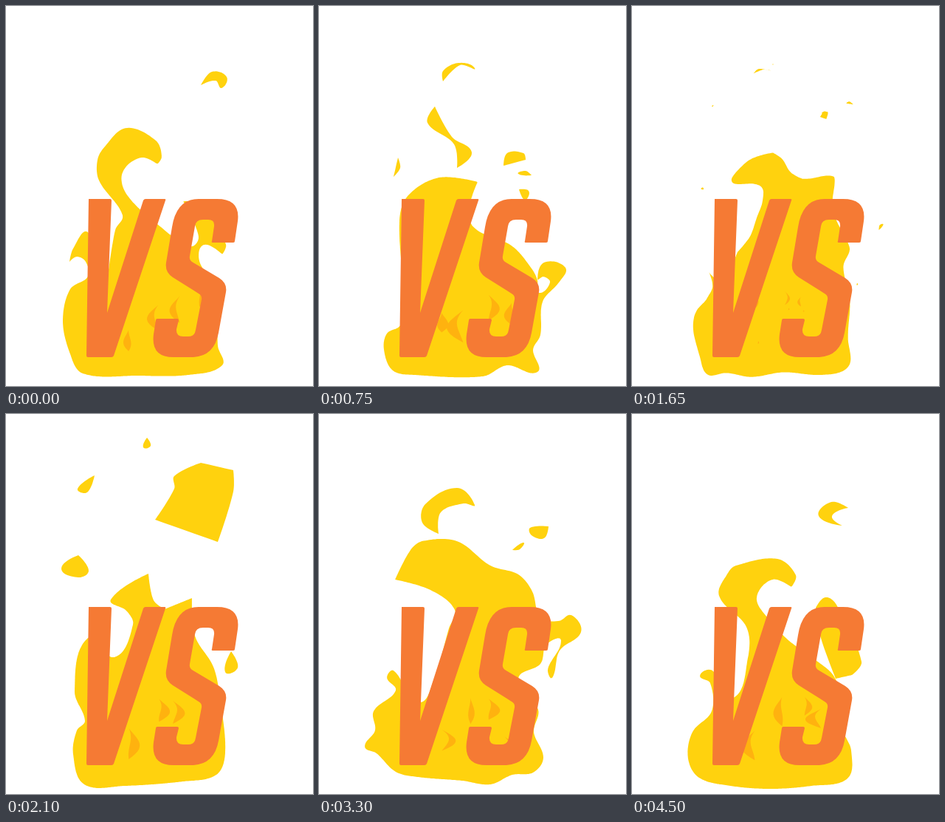
An HTML page that plays this animation: 416x514 px, repeating every 4650 ms.

```html
<!DOCTYPE html>
<html lang="en">
<head>
<meta charset="utf-8">
<title>VS</title>
<style>
html, body { margin: 0; width: 100%; height: 100%; overflow: hidden; background: #fff; }
svg { display: block; width: 100%; height: 100%; }
#body, #sparks { fill: #ffd20e; }
#licks { fill: #ffb20f; }
#letters { fill: #f57a34; }
</style>
</head>
<body>
<svg viewBox="0 0 416 514" role="img" aria-label="VS">
  <path id="body"/>
  <path id="licks"/>
  <path id="sparks"/>
  <g id="letters">
    <path d="M112 261H141Q143 261 143 263L137 415L186 263Q187 261 189 261H215Q217 261 216 263L146 473Q145 475 143 475H111Q109 475 109 473Z"/>
    <path d="M261 261H286Q318 261 314 291L310 318Q310 320 308 320H280Q278 320 279 318L282 298Q283 289 274 289H267Q257 289 256 298L249 338Q248 343 252 346L289 368Q300 375 298 387L288 442Q282 475 251 475H227Q196 475 200 444L203 425Q203 423 205 423H232Q234 423 234 425L231 437Q230 447 240 447H247Q256 447 257 438L265 397Q266 392 261 389L226 367Q215 360 217 347L225 299Q231 261 261 261Z"/>
  </g>
</svg>
<script>
const STEP = 150, STEPS = 31, RISE = 13;

// Key points joined by smooth curves; "!" marks a sharp corner.
// Each body starts at the lower left and runs clockwise.
const poses = [
  {
    at: 0,
    body: "104,497 86,468 77,425 87,383 111,366 108,346 96,339 86,346! 91,328 111,306 137,372! 148,303 158,283 126,236 124,208 134,190 163,165 203,182 211,204 205,214! 183,205 158,225 163,254 205,295 250,325 261,312 240,264! 262,268 298,322 293,336! 268,323 262,345 285,385 287,460 293,486 247,499 180,500",
    sparks: ["264,107! 279,89 299,96 292,111 284,101"]
  },
  {
    at: 5,
    body: "100,493 88,465 92,443 110,432 115,400 109,290 121,256 163,232 215,238! 205,293 262,325 288,355 296,371 298,388 313,374 304,366 296,370 305,347 334,354 325,374 303,400 300,445 290,465 296,495 255,486 222,501 130,499",
    sparks: [
      "168,102! 168,88 189,77 211,84 191,80",
      "157,136! 147,158 183,187 187,219! 207,198 180,177",
      "107,205! 101,231! 110,219",
      "250,216! 255,199 277,199 280,208!",
      "270,227 280,223 288,229!",
      "271,248! 284,250 281,262 276,260"
    ]
  },
  {
    at: 9,
    body: "100,497 91,470 79,412 95,382 108,366 104,343! 135,395 157,366 184,270 189,245 174,223 123,228 131,200 152,189 190,189 210,205 240,215 277,217 292,256 309,320 280,347 295,400 292,450 296,490 255,501 205,492 160,501 125,490",
    sparks: [
      "149,123! 165,108 206,113 182,110",
      "283,158! 294,152 307,162!",
      "331,336! 334,319 346,317"
    ]
  },
  {
    at: 14,
    body: "106,501 91,460 96,428 107,415 93,375 111,303 147,329 172,285 163,266 142,251 193,216! 200,252 215,264! 252,249! 256,300 281,342 290,385 297,458 285,488 240,497 160,503",
    sparks: [
      "191,32! 186,45 196,43",
      "120,83! 97,101 110,106",
      "264,66! 228,84 228,101 202,143! 287,173! 308,105 308,76!",
      "98,191! 75,209 98,221 112,212",
      "305,321! 297,349 314,343"
    ]
  },
  {
    at: 22,
    body: "104,484 78,459 62,450 76,428 74,402 104,374 92,357 101,347 135,390 156,358 176,290 184,265 151,238 103,224! 124,184 140,172 187,172 232,205 270,217 289,240 300,275 325,280 342,272 355,295 326,320 316,357 310,345 328,306 308,312 300,338 270,358 297,400 291,430 304,465 290,485 262,488 232,501 194,496 134,491",
    sparks: [
      "162,162! 140,147 144,122 187,100 211,123 196,121 165,133",
      "286,154 311,152! 305,168 288,164",
      "262,184! 277,174 272,183"
    ]
  },
  {
    at: 26,
    body: "100,493 89,465 108,425 95,345 111,307 143,275 144,200 185,159 228,187 272,181! 268,215 249,246 250,336 284,358 298,400 312,399! 302,425 299,475 272,488 268,502 230,506 185,492 140,499",
    sparks: [
      "177,15! 172,29 181,24",
      "109,85! 98,101 128,119! 138,102!",
      "205,136 225,127 284,149 263,181! 241,147 215,148",
      "19,236 64,206 107,220 117,254! 80,229 58,238"
    ]
  },
  {
    at: 30,
    body: "91,492 76,466 82,430 108,402 106,364 92,354 109,347 135,385 157,330 155,288 118,246 130,215 141,205 197,196 222,218 216,234! 190,224 169,248 183,275 212,306 245,330 275,357 288,410 287,430 297,455 292,493 243,503 188,507 134,503",
    sparks: [
      "253,138 270,119 293,127! 271,138 285,151!",
      "249,262! 262,248 277,258 311,335 298,353! 276,358! 255,300"
    ]
  }
];

const dist = (a, b) => Math.hypot(b[0] - a[0], b[1] - a[1]);
const mix = (a, b, u) => a + (b - a) * u;

// Turns key points into a dense closed polyline.
function trace(text) {
  const knots = text.split(" ").map(s => ({ p: s.replace("!", "").split(",").map(Number), sharp: s.endsWith("!") }));
  const n = knots.length;
  const dirs = knots.map((k, i) => {
    if (k.sharp) return [0, 0];
    const a = knots[(i + n - 1) % n].p, b = knots[(i + 1) % n].p, len = dist(a, b) || 1;
    return [(b[0] - a[0]) / len, (b[1] - a[1]) / len];
  });
  const out = [];
  knots.forEach(({ p }, i) => {
    const j = (i + 1) % n, q = knots[j].p, reach = dist(p, q) / 3;
    for (let s = 0; s < 12; s++) {
      const t = s / 12, r = 1 - t;
      out.push([0, 1].map(k =>
        r * r * r * p[k] + 3 * r * r * t * (p[k] + dirs[i][k] * reach) +
        3 * r * t * t * (q[k] - dirs[j][k] * reach) + t * t * t * q[k]));
    }
  });
  return out;
}

// Spreads count points evenly along an open polyline.
function spread(line, count) {
  const sums = [0];
  for (let i = 1; i < line.length; i++) sums.push(sums[i - 1] + dist(line[i - 1], line[i]));
  const total = sums[sums.length - 1], out = [];
  for (let c = 0, i = 0; c < count; c++) {
    const d = total * c / count;
    while (sums[i + 1] < d) i++;
    const u = (d - sums[i]) / (sums[i + 1] - sums[i] || 1);
    out.push([0, 1].map(k => mix(line[i][k], line[i + 1][k], u)));
  }
  return out;
}

// Left side, right side and base are matched separately, so the morph stays upright.
function align(line) {
  const best = score => line.reduce((m, p, i) => score(p) > score(line[m]) ? i : m, 0);
  const top = best(p => -p[1]), foot = best(p => p[0] + 2 * p[1]);
  return [
    ...spread(line.slice(0, top + 1), 220),
    ...spread(line.slice(top, foot + 1), 220),
    ...spread([...line.slice(foot), line[0]], 120)
  ];
}

function seeded(seed) {
  return () => {
    seed = (seed * 16807) % 2147483647;
    return seed / 2147483647;
  };
}

// A darker tongue: a bent upright spine, widest low down.
function lick(rnd, slot) {
  const x = 165 + slot * 28 + rnd() * 16, y = 375 + rnd() * 65;
  const height = 24 + rnd() * 24, width = 4 + rnd() * 4, bend = (rnd() - 0.5) * 32;
  const side = sign => Array.from({ length: 13 }, (_, i) => {
    const t = i / 12;
    return [x + bend * Math.sin(Math.PI * t) + sign * width * Math.sin(Math.PI * t ** 1.4), y + height * t];
  });
  return [...side(-1), ...side(1).reverse()];
}

for (const pose of poses) {
  const rnd = seeded(9001 + pose.at * 77);
  pose.body = align(trace(pose.body));
  pose.sparks = pose.sparks.map(trace);
  pose.licks = [0, 1, 2, 3].map(slot => lick(rnd, slot));
}

const toPath = line => "M" + line.map(p => p[0].toFixed(1) + " " + p[1].toFixed(1)).join("L") + "Z";

function place(shapes, size, dy) {
  if (size <= 0) return "";
  return shapes.map(line => {
    const mid = [0, 1].map(k => line.reduce((sum, p) => sum + p[k], 0) / line.length);
    return toPath(line.map(p => [mix(mid[0], p[0], size), mix(mid[1], p[1], size) + dy]));
  }).join("");
}

function set(id, d) {
  document.getElementById(id).setAttribute("d", d);
}

function draw(step) {
  let i = poses.length - 1;
  while (poses[i].at > step) i--;
  const a = poses[i], b = poses[i + 1] || a;
  const span = b.at - a.at || 1, gone = step - a.at, u = gone / span;

  const sway = 9 * Math.sin(Math.PI * u);
  set("body", toPath(a.body.map((p, k) => {
    const x = mix(p[0], b.body[k][0], u), y = mix(p[1], b.body[k][1], u);
    return [x + sway * Math.sin(y / 26 + step * 1.7) * Math.max(0, 490 - y) / 250, y];
  })));

  // Loose pieces rise and shrink away while the next ones grow from below.
  const pair = (kind, rise) =>
    place(a[kind], 1 - u * 1.5, -gone * rise) + place(b[kind], u * 1.5 - 0.5, (span - gone) * rise);
  set("licks", pair("licks", 3));
  set("sparks", pair("sparks", RISE));
}

let shown = -1;
const start = performance.now();
function tick() {
  const step = Math.floor(Math.max(0, performance.now() - start) / STEP) % STEPS;
  if (step !== shown) draw(shown = step);
  requestAnimationFrame(tick);
}
tick();
</script>
</body>
</html>
```
